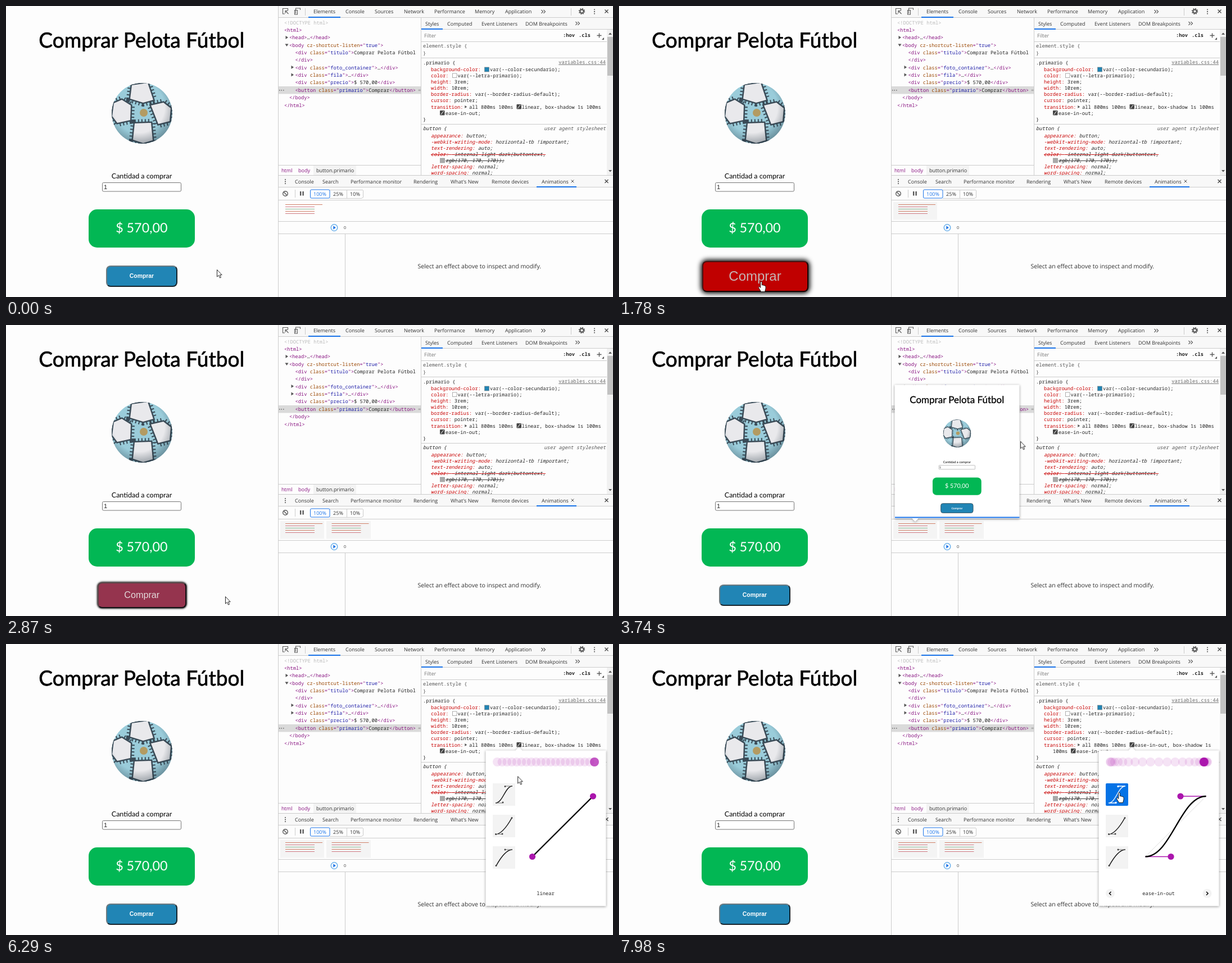
An HTML page that plays this animation: 1080x518 px, repeating every 8000 ms.

```html
<!DOCTYPE html>
<html lang="es">
<head>
<meta charset="utf-8">
<title>Comprar</title>
<style>
html,body{margin:0;width:100%;height:100%;overflow:hidden;background:#fdfdfd}
svg{position:absolute;left:0;top:0}
text{white-space:pre;text-rendering:geometricPrecision;fill:#222}
.ui{font:9.05px "Open Sans","Noto Sans",sans-serif}
.ui text{fill:#333}
.code{font:8.72px "Noto Sans Mono","DejaVu Sans Mono",monospace}
.page{font-family:Lato,"Open Sans",sans-serif}
.arial{font-family:"Liberation Sans",Arial,sans-serif}
.mid{text-anchor:middle}
.end{text-anchor:end}
.i{font-style:italic}
.t{fill:#881280}.a{fill:#994500}.v{fill:#1a1aa6}.p{fill:#c80000}
.ui .t{fill:#881280}.ui .blue{fill:#1a73e8}
.off{text-decoration:line-through}
.line{stroke:#ccc;fill:none;shape-rendering:crispEdges}
.ico{stroke:#5a5a5a;stroke-width:1.1;fill:none}
.dark{fill:#555}
.pur{fill:#ab16ad}
.shadow{filter:drop-shadow(0 1px 2px #0006)}

#buy{position:absolute;box-sizing:border-box;display:flex;align-items:center;justify-content:center;
 border:2px solid;border-radius:8px;font-family:"Liberation Sans",Arial,sans-serif;animation:buy 8s linear infinite,glow 8s ease-in-out infinite}
@keyframes buy{
 0%,12%,40.875%,to{left:178px;top:461.5px;width:127px;height:38.5px;font-size:10.4px;font-weight:700;color:#fff;background:#2185b5;border-color:#6c7a80 #16242c #16242c #6c7a80}
 17%,35.875%{font-size:16.2px;font-weight:400;background:#95344e}
 22%,30.875%{left:147.5px;top:453.5px;width:189px;height:55.5px;font-size:24px;font-weight:400;color:#c6b4b4;background:#c00000;border-color:#4a1010 #150000 #150000 #4a1010}
}
@keyframes glow{
 0%,12%,40%,to{box-shadow:0 0 0 0 #0000}
 12.01%,39.99%{box-shadow:0 0 0 0 #000}
 24%,30%{box-shadow:0 0 9px 2.5px #000}
}
.st{animation:8s step-end infinite}
.an{animation:8s linear infinite}
#first{animation-name:first}
#second{animation-name:second}
#mini{animation-name:mini}
#bar{animation-name:bar}
#checks{animation-name:checks}
#hot{animation-name:hot}
#tip{animation-name:tip}
#pop{animation-name:pop}
#onion{animation-name:onion}
.lin{animation-name:lin}
.eio{animation-name:eio}
#hover{animation-name:hover}
#dotA{animation-name:dotA}
#dotB{animation-name:dotB}
#cursor{animation-name:cursor}
#arrow{animation-name:arrow}
#hand{animation-name:hand}
@keyframes first{0%{opacity:0}15%,to{opacity:1}}
@keyframes second{0%,32%{opacity:0}33%,to{opacity:1}}
@keyframes mini{0%{opacity:0}41.25%{opacity:1}47.75%,to{opacity:0}}
@keyframes bar{0%,41.25%{transform:scaleX(0)}46.5%,to{transform:scaleX(1)}}
@keyframes checks{0%{opacity:0}48.25%{opacity:1}71.25%,to{opacity:0}}
@keyframes hot{0%{opacity:0}53.7%{opacity:1}70.6%,to{opacity:0}}
@keyframes tip{0%,54.8%{opacity:0}55.3%,59.4%{opacity:1}60.4%{opacity:.2}61.25%,to{opacity:0}}
@keyframes pop{0%{opacity:0}59.375%,to{opacity:1}}
@keyframes onion{0%{opacity:0}60.9%{opacity:1}84.125%,to{opacity:0}}
@keyframes lin{0%{opacity:1}84.125%,to{opacity:0}}
@keyframes eio{0%{opacity:0}84.125%,to{opacity:1}}
@keyframes hover{0%{opacity:0}79.45%{opacity:1}84.125%,to{opacity:0}}
@keyframes dotA{
 0%,60%{transform:translateX(0);opacity:1}
 78%{transform:translateX(173px);opacity:1}
 80%,to{transform:translateX(173px);opacity:0}
}
@keyframes dotB{
 0%,84.12%{transform:none;opacity:0}
 84.15%{transform:none;opacity:1;animation-timing-function:cubic-bezier(.429,0,.619,.8325)}
 to{transform:translateX(168px);opacity:1}
}
@keyframes cursor{
 0%,10%{transform:translate(375px,469px)}
 10.75%{transform:translate(304px,482px)}
 12.5%{transform:translate(262px,490px)}
 13.75%,28.25%{transform:translate(253px,490px)}
 29.6%{transform:translate(305px,488px)}
 31.9%{transform:translate(378px,484px)}
 35.9%,38.9%{transform:translate(390px,483px)}
 40.6%{transform:translate(520px,372px)}
 43.1%{transform:translate(535px,364px)}
 46.75%{transform:translate(713px,207px)}
 48.5%{transform:translate(860px,172px)}
 51%{transform:translate(904px,172px)}
 53.75%,70%{transform:translate(912px,179px)}
 75%{transform:translate(918px,212px)}
 78.6%{transform:translate(911px,234px)}
 79.5%{transform:translate(891px,263px)}
 81.5%,to{transform:translate(890px,264px)}
}
@keyframes arrow{0%{opacity:1}10.75%{opacity:0}29.6%{opacity:1}79.45%,to{opacity:0}}
@keyframes hand{0%{opacity:0}10.75%{opacity:1}29.6%{opacity:0}79.45%,to{opacity:1}}
</style>
</head>
<body>
<svg width="1080" height="518">
<defs>
 <clipPath id="round"><circle cx="242" cy="191" r="54"/></clipPath>
 <clipPath id="pane"><rect x="739" y="21" width="330" height="280"/></clipPath>
 <radialGradient id="shade" cx=".45" cy=".4" r=".6">
  <stop offset=".7" stop-color="#1b2c38" stop-opacity="0"/><stop offset="1" stop-color="#1b2c38" stop-opacity=".35"/>
 </radialGradient>
 <path id="panels" d="M224 141L252 137L262 167L244 172L221 165ZM192 173L206 167L222 177L221 203L198 208L189 196ZM258 177L280 172L293 182L291 205L271 210ZM229 209L258 208L261 239L244 244L226 238Z"/>
 <g id="check"><rect x="742" y="-5" width="10" height="10" rx="1.5" fill="#0075e8"/><path d="M744.3 0l2 2.2 3.5-4.4" stroke="#fff" stroke-width="1.5" fill="none"/></g>
 <g id="curve"><rect width="8.5" height="8.5" y="-4.5" rx="1" fill="#444"/><path d="M1.5 2.5C4 2.5 4-3 7-3" stroke="#fff" fill="none"/></g>
 <path id="x" d="M-3-3L3 3M3-3L-3 3" stroke="#444" stroke-width="1.2"/>
 <path id="more" d="M0-4.5v1.8M0-.9v1.8M0 2.7v1.8" stroke="#555" stroke-width="1.8"/>
 <path id="chev" d="M-3.5-3l3 3-3 3M.5-3l3 3-3 3" class="ico"/>
 <path id="right" class="dark" d="M-2-3L2.5 0L-2 3Z"/>
 <g id="lines" fill="none">
  <path d="M497 353.5h66M497 365.5h52" stroke="#d08068"/>
  <path d="M497 357.5h52M497 369.5h52" stroke="#cf7c84"/>
  <path d="M497 361.5h52" stroke="#8db795"/>
 </g>
</defs>

<g id="page" class="page">
 <text class="mid" x="241.3" y="74" font-size="37.1" style="fill:#000;stroke:#000;stroke-width:.7;stroke-linejoin:round">Comprar Pelota Fútbol</text>
 <g clip-path="url(#round)">
  <circle cx="242" cy="191" r="54" fill="#9accda"/>
  <use href="#panels" fill="none" stroke="#3a4b57" stroke-width="14" stroke-dasharray="2 4"/>
  <use href="#panels" fill="none" stroke="#3a4b57" stroke-width="5"/>
  <use href="#panels" fill="#e9e9ec"/>
  <circle cx="242" cy="191" r="54" fill="url(#shade)"/>
  <circle cx="245" cy="190" r="7" fill="#b39b62"/>
 </g>
 <text class="mid" x="241.5" y="306.5" font-size="12.5" style="fill:#000">Cantidad a comprar</text>
 <rect x="171.5" y="314.5" width="140" height="15.5" rx="2" fill="#fff" stroke="#767676"/>
 <text class="arial" x="174" y="326" font-size="11">1</text>
 <rect x="147" y="362" width="189" height="68" rx="15" fill="#02b754"/>
 <text class="mid" x="241.3" y="403" font-size="23.3" style="fill:#fff">$ 570,00</text>
</g>

<path class="line" d="M484.5 0v518"/>
<path fill="#f8f8f8" d="M485 0h595v20h-595zM739 21h341v20h-341zM485 302h595v20h-595z"/>
<path class="line" d="M485 20.5h595M485 283.5h253M485 301.5h595M738.5 20v281M739 41.5h341M739 63.5h330M739 92.5h330M739 210.5h330M485 322.5h595M485 345.5h595M485 383.5h595M485 405.5h595M603.5 406v112M532.5 4v13M1005.5 4v13M514.5 327v14"/>
<path fill="#1a73e8" d="M538 19h57v2h-57zM739 40h38v2h-38zM944 321h71v2h-71z"/>

<g class="ui">
 <text x="547" y="13.3">Elements</text><text x="604" y="13.3">Console</text><text x="656" y="13.3">Sources</text>
 <text x="708" y="13.3">Network</text><text x="762" y="13.3">Performance</text><text x="834" y="13.3">Memory</text><text x="888" y="13.3">Application</text>
 <text x="746" y="34.6">Styles</text><text x="785" y="34.6">Computed</text><text x="846" y="34.6">Event Listeners</text><text x="924" y="34.6">DOM Breakpoints</text>
 <text x="744" y="55.8" style="fill:#777">Filter</text>
 <rect x="547" y="284" width="76" height="17" fill="#f3f3f3"/>
 <text class="t" x="490" y="296.3">html</text><text class="t" x="520" y="296.3">body</text><text x="552" y="296.3">button.primario</text>
 <text x="514" y="316">Console</text><text x="563" y="316">Search</text><text x="613" y="316">Performance monitor</text><text x="725" y="316">Rendering</text>
 <text x="791" y="316">What's New</text><text x="864" y="316">Remote devices</text><text x="953" y="316">Animations</text>
 <path class="line" d="M576 327.5h57q2.5 0 2.5 2.5v9.5q0 2.5-2.5 2.5h-57M606.5 327v15"/>
 <rect x="541.5" y="327" width="34.5" height="15" rx="2" fill="#fff" stroke="#1a73e8"/>
 <text class="mid blue" x="558.5" y="338">100%</text><text class="mid" x="591" y="338">25%</text><text class="mid" x="621" y="338">10%</text>
 <text x="601" y="396.5" font-size="7">0</text>
 <text class="mid" x="842.3" y="467.3" font-size="10.6">Select an effect above to inspect and modify.</text>
</g>

<path class="ico" d="M496 14h-3.5v-9.5h9v3.5M497 8.5l5.5 5.5M497 13v-4.5h4.5M515.5 13.5v-9.5h8v3M513.5 7.5h5v7.5h-5z"/>
<use href="#chev" x="956" y="10"/><use href="#chev" x="1017" y="31"/>
<circle class="ico" cx="1024.5" cy="9.5" r="3.2" style="stroke-width:2.2"/>
<circle class="ico" cx="1024.5" cy="9.5" r="4.8" style="stroke-width:1.8;stroke-dasharray:1.9 1.87"/>
<use href="#more" x="1047" y="10"/><use href="#more" x="497" y="312.5"/>
<use href="#x" x="1068.5" y="9.5"/><use href="#x" x="1068.5" y="312"/><use href="#x" transform="translate(1008 312)scale(.8)"/>
<path class="ico" d="M1055.5 48.5v8M1051.5 52.5h8" style="stroke-width:1.4"/><path class="dark" d="M1064 56v4h-4z"/>
<circle class="ico" cx="497" cy="334" r="4.3" style="stroke-width:1.4"/><path class="ico" d="M494 331l6 6" style="stroke-width:1.4"/>
<path class="dark" d="M523 330h2.3v7.5h-2.3zM527.5 330h2.3v7.5h-2.3z"/>
<circle cx="584" cy="394.5" r="5.8" fill="none" stroke="#58a6e8" stroke-width="1.3"/><path d="M582.3 391.3l4.5 3.2-4.5 3.2z" fill="#1a73e8"/>
<path fill="#f1f1f1" d="M1069 42h11v259h-11z"/><path fill="#c1c1c1" d="M1070 55h10v69h-10z"/>
<path class="dark" d="M1072 51l3-3.5 3 3.5zM1072 292l3 3.5 3-3.5z"/>

<g class="code">
 <rect x="485" y="143" width="253" height="13.5" fill="#dadada"/>
 <text x="495" y="32.5" style="fill:#bbb">&lt;!DOCTYPE html&gt;</text>
 <text class="t" x="495" y="46">&lt;html&gt;</text>
 <text class="t" x="504" y="59.4">&lt;head&gt;<tspan fill="#222">…</tspan>&lt;/head&gt;</text>
 <text class="t" x="504" y="72.8">&lt;body <tspan class="a">cz-shortcut-listen</tspan>="<tspan class="v">true</tspan>"&gt;</text>
 <text class="t" x="514.5" y="86.1">&lt;div <tspan class="a">class</tspan>="<tspan class="v">titulo</tspan>"&gt;<tspan fill="#222">Comprar Pelota Fútbol</tspan></text>
 <text class="t" x="514.5" y="99.4">&lt;/div&gt;</text>
 <text class="t" x="514.5" y="112.7">&lt;div <tspan class="a">class</tspan>="<tspan class="v">foto_container</tspan>"&gt;<tspan fill="#222">…</tspan>&lt;/div&gt;</text>
 <text class="t" x="514.5" y="126">&lt;div <tspan class="a">class</tspan>="<tspan class="v">fila</tspan>"&gt;<tspan fill="#222">…</tspan>&lt;/div&gt;</text>
 <text class="t" x="514.5" y="139.4">&lt;div <tspan class="a">class</tspan>="<tspan class="v">precio</tspan>"&gt;<tspan fill="#222">$ 570,00</tspan>&lt;/div&gt;</text>
 <text class="t" x="514.5" y="152.8">&lt;button <tspan class="a">class</tspan>="<tspan class="v">primario</tspan>"&gt;<tspan fill="#222">Comprar</tspan>&lt;/button&gt;</text>
 <text x="733" y="152.8" style="fill:#888">=</text>
 <path d="M486 150h1.5M489.5 150h1.5M493 150h1.5" stroke="#666" stroke-width="1.5"/>
 <text class="t" x="504" y="166.2">&lt;/body&gt;</text>
 <text class="t" x="495" y="179.5">&lt;/html&gt;</text>
 <use href="#right" x="499.5" y="56"/><use href="#right" x="509.5" y="109"/><use href="#right" x="509.5" y="122.5"/>
 <path class="dark" d="M496.5 67.5h6l-3 4.5z"/>

 <text x="991" y="55.3" font-weight="700">:hov</text><text x="1019" y="55.3" font-weight="700">.cls</text>
 <text x="742" y="74" style="fill:#555">element.style {</text><text x="742" y="87" style="fill:#555">}</text>
 <text x="742" y="103.5">.primario {</text>
 <text class="end" x="1067" y="103" style="fill:#666;text-decoration:underline">variables.css:44</text>
 <text class="p" x="756" y="116.3">background-color:</text><rect x="851.5" y="109" width="8" height="8" fill="#2185b5" stroke="#777" stroke-width=".6"/><text x="861" y="116.3">var(--color-secundario);</text>
 <text class="p" x="756" y="127.4">color:</text><rect x="794.5" y="120" width="7.5" height="7.5" fill="#fff" stroke="#999" stroke-width=".8"/><text x="803.5" y="127.4">var(--letra-primario);</text>
 <text class="p" x="756" y="138.4">height: <tspan fill="#222">3rem;</tspan></text>
 <text class="p" x="756" y="149.4">width: <tspan fill="#222">10rem;</tspan></text>
 <text class="p" x="756" y="160.4">border-radius: <tspan fill="#222">var(--border-radius-default);</tspan></text>
 <text class="p" x="756" y="171.4">cursor: <tspan fill="#222">pointer;</tspan></text>
 <text class="p" x="756" y="182.5">transition:</text><use href="#right" transform="translate(818 179.5)scale(.85)"/>
 <text x="824" y="182.5">all 800ms 100ms</text><use href="#curve" x="908.5" y="179.5"/>
 <g id="hot" class="st"><rect x="908.5" y="175" width="8.5" height="8.5" rx="1" class="pur"/></g>
 <g class="lin st"><text x="917.5" y="182.5">linear, box-shadow 1s 100ms</text><use href="#curve" x="772" y="190.5"/><text x="782" y="193.5">ease-in-out;</text></g>
 <g class="eio st"><text x="917.5" y="182.5">ease-in-out, box-shadow 1s</text><text x="772" y="193.5">100ms</text><use href="#curve" x="804" y="190.5"/><text x="814" y="193.5">ease-in-out;</text></g>
 <text x="742" y="204.5">}</text>
 <g id="checks" class="st"><use href="#check" y="113"/><use href="#check" y="124"/><use href="#check" y="135"/><use href="#check" y="146"/><use href="#check" y="157"/><use href="#check" y="168"/><use href="#check" y="179.5"/></g>
 <g class="i" clip-path="url(#pane)">
  <text x="742" y="221.3">button {</text><text class="end" x="1067" y="221.3" style="fill:#555">user agent stylesheet</text>
  <text class="p" x="756" y="234.2">appearance: <tspan fill="#222">button;</tspan></text>
  <text class="p" x="756" y="245.2">-webkit-writing-mode: <tspan fill="#222">horizontal-tb !important;</tspan></text>
  <text class="p" x="756" y="256.3">text-rendering: <tspan fill="#222">auto;</tspan></text>
  <text class="p off" x="756" y="267.4">color: <tspan fill="#222">-internal-light-dark(buttontext,</tspan></text>
  <rect x="772.5" y="271" width="8" height="8" fill="#aaa" stroke="#888" stroke-width=".6"/>
  <text class="off" x="782" y="278.4">rgb(170, 170, 170));</text>
  <text class="p" x="756" y="289.4">letter-spacing: <tspan fill="#222">normal;</tspan></text>
  <text class="p" x="756" y="300.3">word-spacing: <tspan fill="#222">normal;</tspan></text>
 </g>
</g>

<path id="first" class="st" fill="#f4f4f4" d="M488 349h78v31.5h-78z"/>
<use href="#lines"/>
<g id="second" class="an"><path fill="#f4f4f4" d="M570 349h79v31.5h-79z"/><use href="#lines" x="82.5"/></g>

<g id="mini" class="st">
 <path class="shadow" fill="#fff" d="M490.5 106.5h222v238h-180l-5.5 5.5-5.5-5.5h-31z"/>
 <g transform="translate(490.5 105.4)scale(.459)">
  <use href="#page"/>
  <rect x="179" y="462.5" width="125" height="36.5" rx="8" fill="#2185b5" stroke="#38505c" stroke-width="2"/>
  <text class="arial mid" x="241.5" y="484.5" font-size="10.4" font-weight="700" style="fill:#fff">Comprar</text>
 </g>
 <g transform="translate(491 341.5)"><rect id="bar" class="an" width="221.5" height="2" fill="#1a73e8"/></g>
</g>

<g id="pop" class="st">
 <path class="shadow" fill="#fff" d="M853.5 189.5h53l6-6 6 6h149v277h-214z"/>
 <g id="onion" class="st pur"></g>
 <g id="onionEase" class="eio st pur"></g>
 <circle id="dotA" class="an pur" cx="874" cy="210" r="8"/>
 <circle id="dotB" class="an pur" cx="874" cy="210" r="8"/>
 <path fill="#f3f3f3" d="M866 248h40v40h-40zM866 304h40v40h-40zM866 360h40v40h-40z"/>
 <rect id="hover" class="st" x="866" y="248" width="40" height="40" fill="#999"/>
 <g fill="none" stroke="#111" stroke-width="1.5">
  <path d="M871 283C884 283 888 253 901 253M871 339Q884 338 900 309.5M872 395Q888 366 901 366"/>
  <path stroke="#777" stroke-width="1" d="M871 283h12M901 253h-12M871 338.5h12M901 366h-12"/>
  <path stroke="#444" stroke-width="3" stroke-linecap="round" d="M884 282h0M888 253.5h0M883 338h0M888 366h0M871.5 338.5h0M900 309.5h0M872 394.5h0"/>
 </g>
 <g class="eio st">
  <rect x="866" y="248" width="40" height="40" rx="2" fill="#0573e6"/>
  <path d="M871 283C884 283 888 253 901 253M871 283h13M901 253h-13" fill="none" stroke="#fff" stroke-width="1.3"/>
  <path d="M884 282.5h0M888 253.5h0" stroke="#fff" stroke-width="3.5" stroke-linecap="round"/>
  <path d="M936.5 378.5L1044.5 271" stroke="#ddd"/>
  <path d="M936.5 378.5h45.5M1044.5 271h-45.5" stroke="#ab16ad" stroke-width="1.3"/>
  <path d="M936.5 378.5C982 378.5 999 271 1044.5 271" fill="none" stroke="#000" stroke-width="2.4"/>
  <circle class="pur" cx="982" cy="378.5" r="5.6"/><circle class="pur" cx="999" cy="271" r="5.6"/>
  <circle cx="874" cy="444" r="8" fill="#f3f3f3"/><circle cx="1046.5" cy="444" r="8" fill="#f3f3f3"/>
  <path d="M875.5 441l-3 3 3 3M1045 441l3 3-3 3" fill="none" stroke="#111" stroke-width="1.6"/>
  <text class="code mid" x="960" y="447">ease-in-out</text>
 </g>
 <g class="lin st">
  <path d="M936.5 378.5L1044.5 271" stroke="#000" stroke-width="2.4"/>
  <circle class="pur" cx="936.5" cy="378.5" r="5.6"/><circle class="pur" cx="1044.5" cy="271" r="5.6"/>
  <text class="code mid" x="960" y="447">linear</text>
 </g>
</g>

<g id="tip" class="an ui">
 <rect class="shadow" x="917.5" y="189.5" width="118" height="16.5" fill="#fff" stroke="#bbb" stroke-width=".8"/>
 <text class="mid" x="976.5" y="201">Open cubic bezier editor.</text>
</g>
</svg>

<div id="buy">Comprar</div>

<svg width="1080" height="518">
<g id="cursor" class="an" stroke="#111" stroke-width=".9" fill="#fff" stroke-linejoin="round">
 <path id="arrow" class="st" d="M.5.5V13L3.4 10.4L5.5 15L7.5 14.1L5.5 9.7H9.2Z"/>
 <path id="hand" class="st" d="M-1.3 1.2Q0-.6 1.3 1.2V7Q2.8 6 3.8 7.3Q5.3 6.6 6 8Q7.8 7.5 8 9.5V13L6.5 18.5H-.3L-4 12.5Q-5.3 9.8-3.6 9.5Q-2.4 9.5-1.3 11.5Z"/>
</g>
</svg>

<script>
// Vertical value of ease-in-out at time x, by bisection.
function ease(x) {
  let lo = 0, hi = 1, s;
  for (let i = 0; i < 30; i++) {
    s = (lo + hi) / 2;
    const at = 1.26 * s * (1 - s) ** 2 + 1.74 * s * s * (1 - s) + s ** 3;
    if (at < x) lo = s; else hi = s;
  }
  return s * s * (3 - 2 * s);
}
function slices(id, curve) {
  let out = '';
  for (let i = 0; i <= 20; i++)
    out += `<circle cx="${874 + 173 * curve(i / 20)}" cy="210" r="8" opacity=".12"/>`;
  document.getElementById(id).innerHTML = out;
}
slices('onion', x => x);
slices('onionEase', ease);
</script>
</body>
</html>
```
